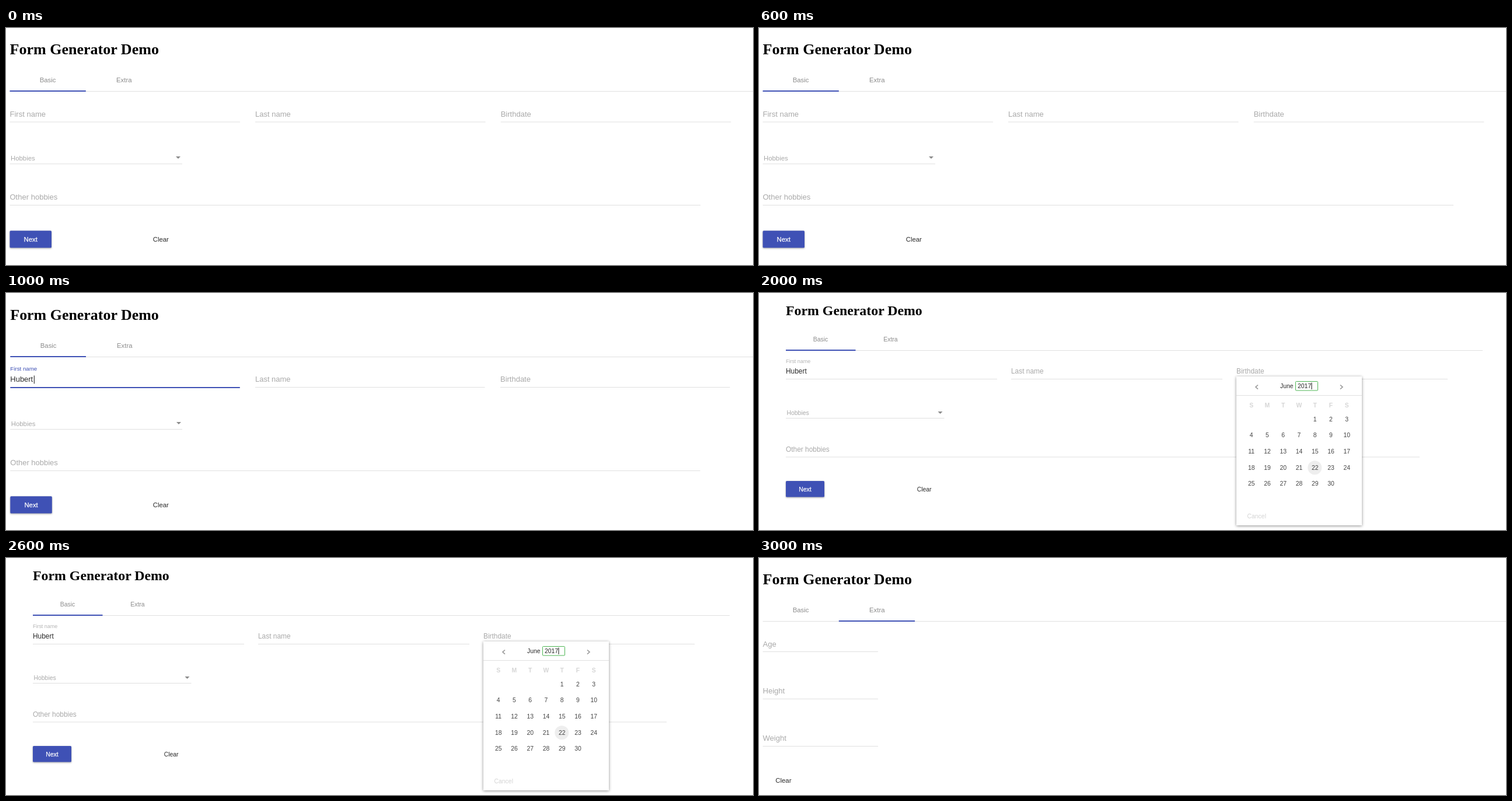
Write an HTML page that moves like this. It is 1280x406 px and loops after 4 s.

```html
<!DOCTYPE html>
<html lang="en">
<head>
<meta charset="utf-8">
<title>Form Generator Demo</title>
<style>
html, body { margin: 0; width: 100%; height: 100%; overflow: hidden; background: #fff; }
svg { display: block; width: 100vw; height: 100vh; font-family: "Liberation Sans", Arial, sans-serif; }
.title { font-family: "Liberation Serif", "Times New Roman", serif; font-weight: bold; }
.button { filter: drop-shadow(0 1.5px 1.5px rgba(0, 0, 0, .35)); }
.popup { filter: drop-shadow(0 1px 2.5px rgba(0, 0, 0, .45)); }
</style>
</head>
<body>
<svg id="stage" viewBox="0 0 1280 406"></svg>
<script>
const BLUE = '#3f51b5', RULE = '#e0e0e0', HINT = '#a9a9a9', TAB = '#8c8c8c', INK = '#2b2b2b';
const STEP = 1000;
const NAME = 'Hubert';

const text = (x, y, size, fill, str, extra = '') =>
  `<text x="${x}" y="${y}" font-size="${size}" fill="${fill}" ${extra}>${str}</text>`;
const rect = (x, y, w, h, fill, extra = '') =>
  `<rect x="${x}" y="${y}" width="${w}" height="${h}" fill="${fill}" ${extra}/>`;
const rule = (x1, x2, y, fill = RULE, h = 1) => rect(x1, y, x2 - x1, h, fill);
const centered = 'text-anchor="middle"';

// k is the page zoom; font sizes are the CSS sizes times k.
function header({ k, x, titleY, tabX, tabY, ruleY, right, tabW }, active) {
  return text(x, titleY, 32 * k, '#000', 'Form Generator Demo', 'class="title"')
    + text(tabX[0], tabY, 14 * k, TAB, 'Basic')
    + text(tabX[1], tabY, 14 * k, TAB, 'Extra')
    + rule(x, right, ruleY)
    + rule(x + active * tabW, x + (active + 1) * tabW, ruleY - 1, BLUE, 2);
}

function basicForm(p) {
  const { k, x, cols, w, fieldY, lineY, hobby, otherY, otherEnd, button, clearX } = p;
  const big = 16 * k, small = 14 * k;
  const labels = ['First name', 'Last name', 'Birthdate'];
  let out = header(p, 0);
  labels.forEach((label, i) => {
    const filled = i === 0 && p.labelY;
    out += filled
      ? text(x, p.labelY, 12 * k, p.focus ? BLUE : '#b4b4b4', label)
        + text(x, fieldY, big, INK, NAME)
      : text(cols[i], fieldY, big, HINT, label);
    out += filled && p.focus
      ? rule(cols[i], cols[i] + w, lineY, BLUE, 2)
      : rule(cols[i], cols[i] + w, lineY);
  });
  if (p.focus) out += rect(x + 40.5, fieldY - 11, 1, 14, '#111');

  const [hobbyY, hobbyLine, hobbyEnd, arrowX, arrowY] = hobby;
  out += text(x + 1.5, hobbyY, small, HINT, 'Hobbies')
    + rule(x, hobbyEnd, hobbyLine)
    + `<path d="M${arrowX - 4} ${arrowY}h8l-4 4z" fill="#8a8a8a"/>`
    + text(x, otherY, big, HINT, 'Other hobbies')
    + rule(x, otherEnd, otherY + p.otherGap);

  const [by, bw, bh] = button;
  const baseline = by + bh / 2 + 4.2;
  return out + rect(x, by, bw, bh, BLUE, 'rx="1.6" class="button"')
    + text(x + bw / 2, baseline, small, '#fff', 'Next',
      centered + ' stroke="#fff" stroke-width=".25"')
    + text(clearX, baseline, small, INK, 'Clear');
}

function calendar(k) {
  const size = 14 * k, colW = 27.25, rowH = 27.7, left = 843.7;
  const chevron = (x, dir) =>
    `<path d="M${x - 2 * dir} 157.5l${4 * dir} 3.6l${-4 * dir} 3.6" fill="none" stroke="#999" stroke-width="1.6"/>`;
  let out = rect(818, 143, 215, 255, '#fff', 'class="popup"')
    + rule(818, 1033, 175)
    + chevron(853, -1) + chevron(998, 1)
    + text(893, 163, size, INK, 'June')
    + rect(919.5, 151.5, 38, 15.5, '#fff', 'rx="1" stroke="#4db553"')
    + text(923, 163, size, INK, '2017')
    + rect(946.5, 153.5, 1, 11.5, '#111');
  [...'SMTWTFS'].forEach((d, i) => {
    out += text(left + i * colW, 195.7, size, '#d6d6d6', d, centered + ' font-weight="bold"');
  });
  out += '<circle cx="952.3" cy="299.3" r="12" fill="#eee"/>';
  for (let day = 1; day <= 30; day++) {
    const cell = day + 3;
    out += text(left + cell % 7 * colW, 219.6 + Math.floor(cell / 7) * rowH, size, '#444', day, centered);
  }
  return out + text(836.5, 385.5, size, '#d4d4d4', 'Cancel');
}

const wide = {
  k: .814, x: 6.5, titleY: 45.3, tabX: [57.7, 189], tabY: 93, ruleY: 108, right: 1280, tabW: 130.3,
  cols: [6.5, 427, 847.7], w: 394.5, fieldY: 151.6, lineY: 160.5,
  hobby: [227, 232.3, 302, 295, 220], otherY: 294.4, otherGap: 8.6, otherEnd: 1190,
  button: [347.3, 71.5, 29.3], clearX: 251.7
};
const typed = {
  ...wide, k: .811, x: 7.3, titleY: 46.2, tabX: [58.8, 190], tabY: 94, ruleY: 109, tabW: 129.7,
  cols: [7.3, 427, 847], w: 393.5, fieldY: 152.4, lineY: 161, labelY: 133, focus: true,
  hobby: [227.7, 233, 302, 296, 221], otherY: 295.2, otherGap: 8.8, otherEnd: 1189.5,
  button: [348.3, 71.5, 29.2]
};
const small = {
  k: .745, x: 46, titleY: 38.3, tabX: [92.7, 213.3], tabY: 83.3, ruleY: 98, right: 1240, tabW: 119.5,
  cols: [46, 432, 818], w: 362, fieldY: 138.3, lineY: 147, labelY: 120.3,
  hobby: [208.8, 214, 317.5, 310.5, 203], otherY: 272.2, otherGap: 8.3, otherEnd: 1132,
  button: [322, 66, 27.5], clearX: 270.7
};

function extraForm() {
  let out = header(wide, 1);
  ['Age', 'Height', 'Weight'].forEach((label, i) => {
    const y = 151.6 + i * 80.7;
    out += text(6.5, y, 16 * wide.k, HINT, label) + rule(6.5, 204, Math.round(y + 8.6));
  });
  return out + text(28.3, 385, 14 * wide.k, INK, 'Clear');
}

const scenes = [
  basicForm(wide),
  basicForm(typed),
  basicForm(small) + calendar(small.k),
  extraForm()
];

const stage = document.getElementById('stage');
let shown = -1;
function draw(ms) {
  const i = Math.floor(ms / STEP) % scenes.length;
  if (i !== shown) stage.innerHTML = scenes[shown = i];
}

const start = performance.now();
function tick() {
  draw(performance.now() - start);
  requestAnimationFrame(tick);
}
tick();
</script>
</body>
</html>
```
